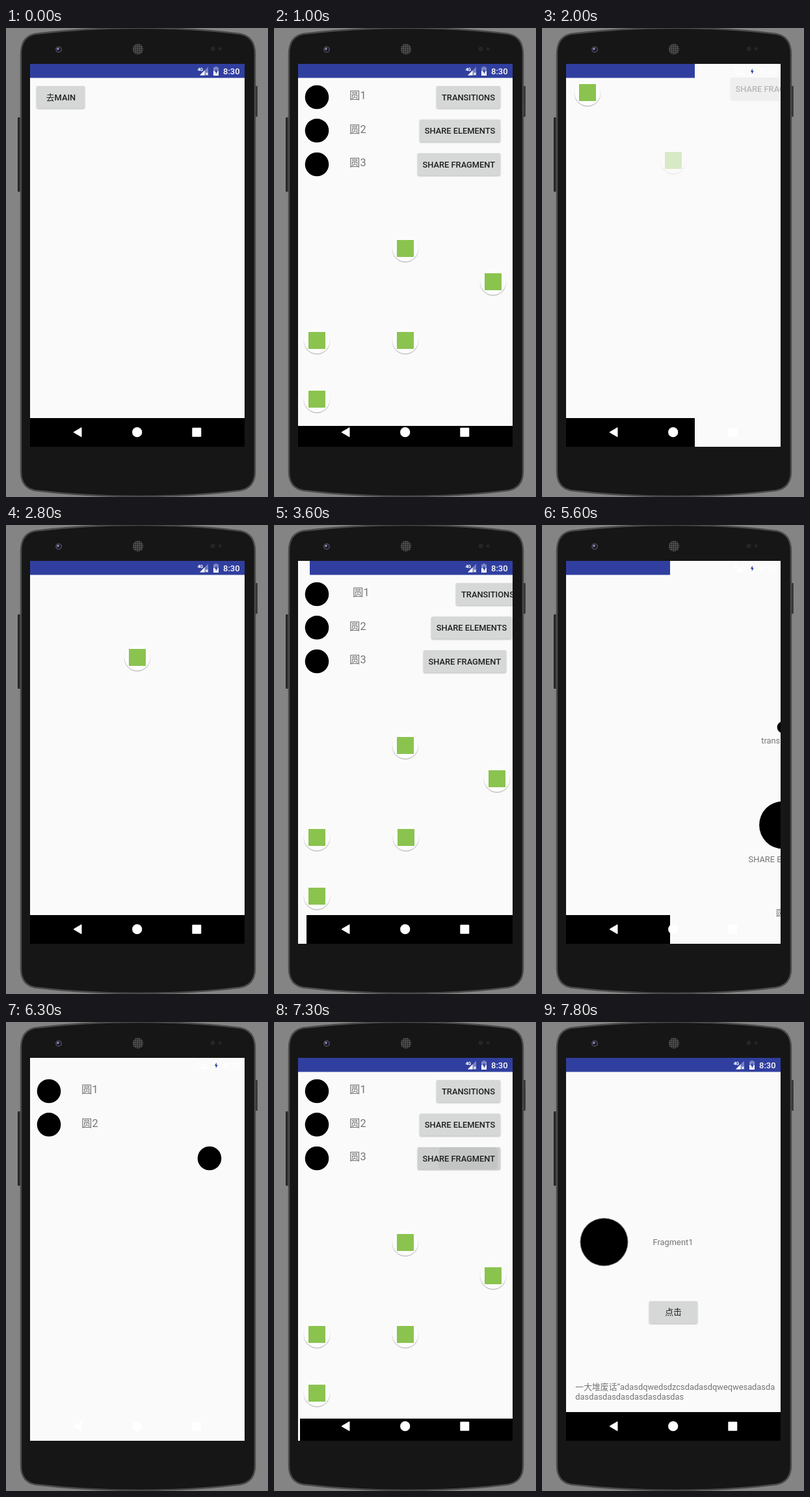
Recreate the animation shown at these times as an HTML page. Size 403 px wide and 719 px high, loop 8000 ms.

```html
<!DOCTYPE html>
<html lang="zh-CN">
<head>
<meta charset="utf-8">
<title>Transitions</title>
<style>
html, body { margin: 0; width: 100%; height: 100%; overflow: hidden; background: #848484; }
svg { display: block; width: 403px; height: 719px; }
text { font: 12.85px Roboto, "Noto Sans CJK SC", sans-serif; fill: #747474; }
.mid, .btn text { text-anchor: middle; }
.btn text { font-weight: 500; fill: #1f1f1f; }
.btn rect { fill: #d6d7d7; filter: drop-shadow(0 1px 1px rgba(0,0,0,.28)); }
.btn .press rect { fill: #000; filter: none; }
.label { font-size: 16.4px; }
.sys, .sys text { fill: #fff; }

.start, .item, .status, .nav, .press, .fab, .share, .frag, .grow {
  animation: 8s linear infinite paused;
}
.start { animation-name: start; }
.item { animation-name: item; }
.status { animation-name: status; }
.nav { animation-name: nav; }
.press { animation-name: press; }
.fab { animation-name: fab; }
.share { animation-name: share; }
.frag { animation-name: frag; }
.grow { animation-name: grow; }

@keyframes start {
  0%, 7.5% { opacity: 1; }
  12.5%, 100% { opacity: 0; }
}
/* a: explode pose, b: first slide-in offset, e: staggered slide-in offset */
@keyframes item {
  0%, 7.5% { opacity: 0; transform: translate(0, 0); }
  12.5%, 20% { opacity: 1; transform: translate(0, 0); }
  25% { opacity: var(--ao, 0); transform: translate(var(--ax, 0px), var(--ay, -120px)); }
  26.25%, 38.7% { opacity: 0; }
  38.75% { opacity: 1; transform: translate(calc(340px + var(--b, 0px)), 0); animation-timing-function: ease-out; }
  45% { opacity: 1; transform: translate(var(--b, 0px), 0); }
  47.5%, 50% { opacity: 1; transform: translate(0, 0); }
  55% { opacity: 0; transform: translate(var(--ax, 0px), var(--ay, -120px)); }
  73.7% { opacity: 0; }
  73.75% { opacity: 1; transform: translate(calc(340px + var(--e, 340px)), 0); }
  78.75% { opacity: 1; transform: translate(var(--e, 340px), 0); animation-timing-function: ease-out; }
  83.75%, 92.5% { opacity: 1; transform: translate(0, 0); }
  96.25%, 100% { opacity: 0; transform: translate(0, 0); }
}
@keyframes status {
  0%, 20% { transform: translate(0, 0); }
  25% { transform: translate(-132px, 0); }
  26.25% { transform: translate(-240px, 0); }
  27.5%, 38.75% { transform: translate(0, 0); }
  38.76% { transform: translate(340px, 0); animation-timing-function: ease-out; }
  45% { transform: translate(18px, 0); }
  47.5%, 50% { transform: translate(0, 0); }
  55% { transform: translate(-340px, 0); }
  55.01%, 61.25% { transform: translate(340px, 0); }
  65%, 67.5% { transform: translate(0, 0); }
  72.5% { transform: translate(-340px, 0); }
  72.51%, 78.75% { transform: translate(340px, 0); animation-timing-function: ease-out; }
  86.25%, 100% { transform: translate(0, 0); }
}
@keyframes nav {
  0%, 7.5% { transform: translate(0, 0); }
  12.5%, 20% { transform: translate(0, 12px); }
  25% { transform: translate(-132px, 0); }
  26.25% { transform: translate(-240px, 0); }
  27.5%, 38.75% { transform: translate(0, 0); }
  38.76% { transform: translate(340px, 0); animation-timing-function: ease-out; }
  45% { transform: translate(13px, 0); }
  47.5%, 50% { transform: translate(0, 0); }
  55% { transform: translate(-340px, 0); }
  55.01%, 61.25% { transform: translate(340px, 0); }
  65%, 67.5% { transform: translate(0, 0); }
  72.5% { transform: translate(-340px, 0); }
  72.51%, 78.75% { transform: translate(340px, 0); animation-timing-function: ease-out; }
  86.25%, 88.75% { transform: translate(0, 0); }
  91.25%, 92.5% { transform: translate(3px, 10px); }
  97.5%, 100% { transform: translate(0, 0); }
}
@keyframes press {
  0%, 88.75% { opacity: 0; }
  91.25%, 100% { opacity: 1; }
}
@keyframes fab {
  0%, 26.2% { opacity: 0; transform: translate(70px, 99px); }
  26.25%, 31.25% { opacity: 1; transform: translate(70px, 99px); }
  35%, 38.75% { opacity: 1; transform: translate(202px, 203px); }
  42.5%, 100% { opacity: 0; transform: translate(202px, 203px); }
}
@keyframes share {
  0%, 53.75% { transform: translate(calc(340px + var(--s, 0px)), 0); animation-timing-function: ease-out; }
  58.75% { transform: translate(var(--s, 0px), 0); }
  61.25%, 67.5% { transform: translate(0, 0); }
  72.5%, 100% { transform: translate(340px, 0); }
}
@keyframes frag {
  0%, 92.5% { opacity: 0; }
  97.5%, 100% { opacity: 1; }
}
@keyframes grow {
  0%, 92.45% { opacity: 0; transform: translate(66px, 209px) scale(.5); }
  92.5% { opacity: 1; transform: translate(66px, 209px) scale(.5); animation-timing-function: ease-out; }
  97.5%, 100% { opacity: 1; transform: translate(95.5px, 337.3px) scale(1); }
}
</style>
</head>
<body>
<svg viewBox="0 0 403 719">
  <defs>
    <clipPath id="screen"><rect x="37" y="55" width="330" height="587"/></clipPath>
    <pattern id="mesh" width="3" height="3" patternUnits="userSpaceOnUse">
      <rect width="3" height="3" fill="#2b2b2b"/><circle cx="1.5" cy="1.5" r=".9" fill="#6c6c6c"/>
    </pattern>
    <linearGradient id="key"><stop stop-color="#1a1a1a"/><stop offset="1" stop-color="#454545"/></linearGradient>
    <g id="round">
      <circle cy="1.2" r="20.3" fill="#000" opacity=".22"/>
      <circle r="20" fill="#fcfcfc"/>
      <rect x="-13" y="-13" width="26" height="26" fill="#8bc34f"/>
    </g>
  </defs>

  <!-- phone -->
  <rect width="403" height="719" fill="#848484"/>
  <rect x="18" y="137" width="5" height="114" rx="1" fill="url(#key)"/>
  <rect x="382" y="89" width="5" height="47" rx="1" fill="url(#key)"/>
  <path d="M23 40Q23 13 45 9Q120 0 203 0Q290 0 360 9Q383 13 383 40V680Q383 705 360 709Q290 718 203 718Q120 718 45 709Q23 705 23 680Z"
    fill="#161616" stroke="#4a4a4b" stroke-width="2.5"/>
  <circle cx="81" cy="33" r="5" fill="#45454c"/>
  <circle cx="81" cy="33" r="3.2" fill="#17162a"/>
  <circle cx="80" cy="32" r="1.7" fill="#9a92c8"/>
  <circle cx="203" cy="32.5" r="8.3" fill="url(#mesh)"/>
  <g fill="#252525"><circle cx="318" cy="32" r="3.5"/><circle cx="329" cy="32" r="2.5"/></g>

  <g clip-path="url(#screen)">
    <rect x="37" y="55" width="330" height="588" fill="#fafafa"/>
    <rect class="status" x="37" y="55" width="330" height="21.5" fill="#303f9f"/>
    <rect class="nav" x="37" y="598" width="330" height="45"/>

    <g class="start btn">
      <rect x="47" y="89" width="74" height="34" rx="2"/><text x="84.5" y="111">去MAIN</text>
    </g>

    <!-- main list -->
    <circle class="item" style="--e:0px" cx="66" cy="106" r="18.3"/>
    <circle class="item" style="--e:0px" cx="66" cy="157.3" r="18.3"/>
    <circle class="item" style="--e:247px" cx="66" cy="209" r="18.3"/>
    <text class="item label" style="--e:0px;--b:5px" x="116" y="109">圆1</text>
    <text class="item label" style="--e:0px" x="116" y="160.5">圆2</text>
    <text class="item label" style="--e:300px" x="116" y="212">圆3</text>
    <g class="item btn" style="--b:30px">
      <rect x="250" y="89" width="98" height="34" rx="2"/><text x="299" y="111">TRANSITIONS</text>
    </g>
    <g class="item btn" style="--b:18px">
      <rect x="224" y="140.5" width="124" height="34" rx="2"/><text x="286" y="162.3">SHARE ELEMENTS</text>
    </g>
    <g class="item btn" style="--b:9px;--ax:69px;--ay:-116px;--ao:.3">
      <rect x="221" y="192" width="127" height="34" rx="2"/>
      <g class="press">
        <rect x="221" y="192" width="127" height="34" rx="2" opacity=".04"/>
        <rect x="253" y="192" width="91" height="34" rx="6" opacity=".05"/>
      </g>
      <text x="284.3" y="213.8">SHARE FRAGMENT</text>
    </g>
    <g class="item" style="--ay:-135px;--ao:.3"><use href="#round" x="202" y="338"/></g>
    <g class="item" style="--b:6px"><use href="#round" x="337" y="389"/></g>
    <g class="item" style="--ax:4px;--ay:-380px;--ao:1"><use href="#round" x="66" y="479"/></g>
    <g class="item" style="--b:1px"><use href="#round" x="202" y="479"/></g>
    <g class="item"><use href="#round" x="66" y="569"/></g>

    <g class="fab"><use href="#round"/></g>

    <!-- shared elements -->
    <g class="share">
      <circle cx="201" cy="310" r="9.3"/><text class="mid" x="197.5" y="334.5">transitions</text>
    </g>
    <g class="share">
      <circle cx="200.7" cy="460" r="36.6"/><text class="mid" x="201.5" y="517.3">SHARE ELEMENTS</text>
    </g>
    <text class="share" style="--s:172px" x="190" y="598.5">圆3</text>

    <!-- fragment -->
    <circle class="grow" r="36.6"/>
    <g class="frag">
      <text class="mid" x="201.5" y="342.3">Fragment1</text>
      <g class="btn"><rect x="165" y="428" width="74" height="34" rx="2"/><text x="202" y="449">点击</text></g>
      <text x="51.3" y="564.3">一大堆废话“adasdqwedsdzcsdadasdqweqwesadasda</text>
      <text x="51.3" y="579.3">dasdasdasdasdasdasdasdas</text>
    </g>

    <!-- system icons -->
    <g class="sys">
      <text x="294.5" y="65.5" style="font-size:7.5px;font-weight:700;letter-spacing:-.8px">4G</text>
      <path d="M298 72.5L311 59.5V72.5Z" opacity=".35"/>
      <path d="M298 72.5L305.5 65V72.5Z"/>
      <path d="M307.3 68.7l3.4 3.4m0-3.4l-3.4 3.4" stroke="#fff" stroke-width="1.2"/>
      <path d="M319 60.5h2.5v-1.5h3v1.5h2.5v5.5h-8z" opacity=".4"/>
      <path d="M319 66h8v7h-8z"/>
      <path d="M323.8 62l-3 5.3h2v3.7l3-5.2h-2z" fill="#303f9f"/>
      <text x="334" y="70.8" style="font-size:13px;font-weight:500">8:30</text>
      <path d="M104 619.7L116 612.7V626.7Z" stroke="#fff" stroke-linejoin="round"/>
      <circle cx="201.7" cy="619.7" r="7.6"/>
      <rect x="286.3" y="612.8" width="14" height="14" rx="1.2"/>
    </g>
  </g>
</svg>
<script>
// Advance the paused keyframes ten times a second.
const LOOP = 8000, STEP = 100;
const tracks = document.getAnimations();
const begin = performance.now();
function tick() {
  const t = (performance.now() - begin) % LOOP;
  const now = Math.floor(t / STEP) * STEP;
  for (const track of tracks) track.currentTime = now;
  requestAnimationFrame(tick);
}
tick();
</script>
</body>
</html>
```
